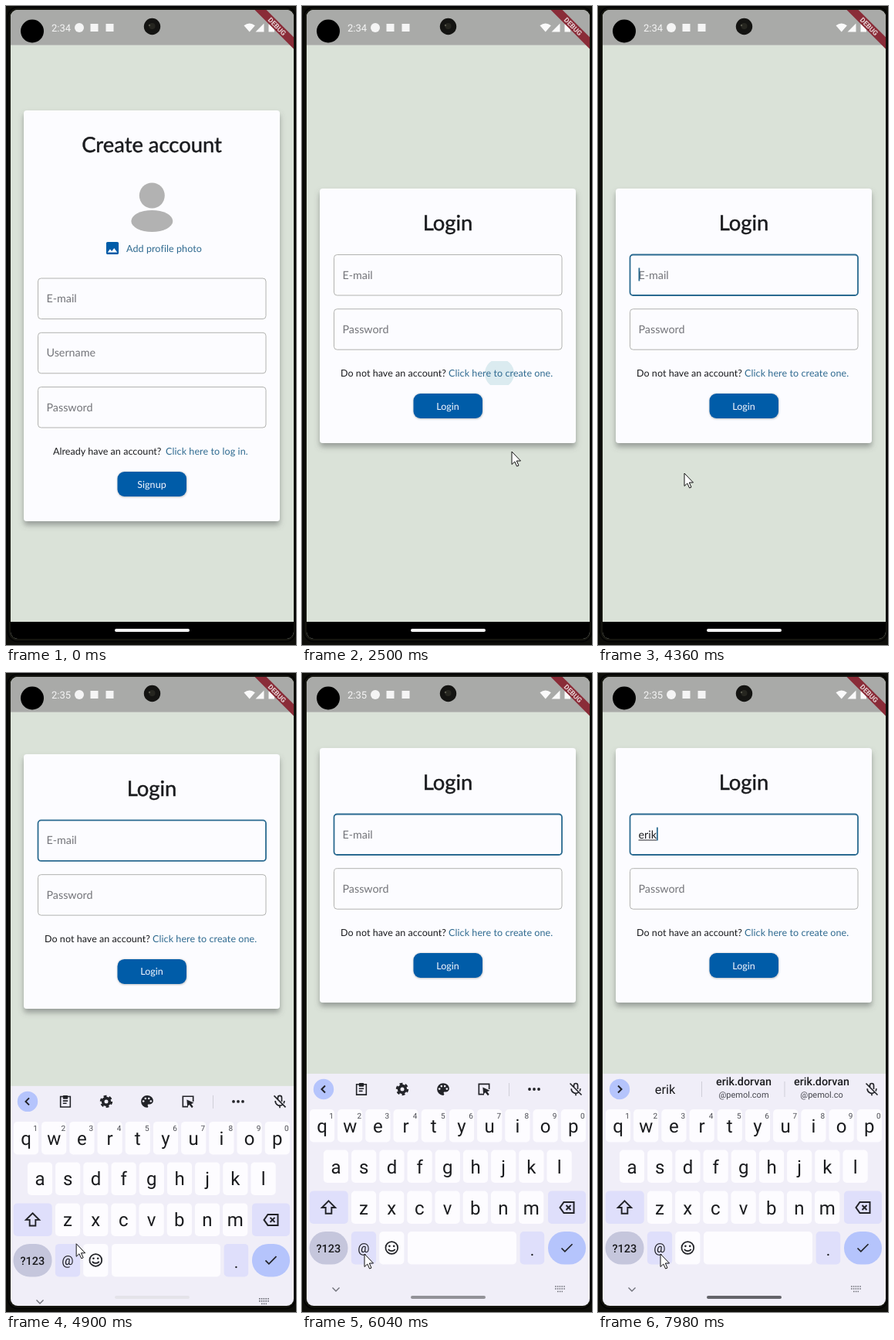
An HTML page that plays this animation: 376x826 px, repeating every 8000 ms.

```html
<!DOCTYPE html>
<html lang="en">
<head>
<meta charset="utf-8">
<title>Login form</title>
<style>
html, body { margin: 0; width: 100%; height: 100%; overflow: hidden; background: #0e0e0a; }
svg { display: block; width: 376px; height: 826px; }
text { font-family: Lato, sans-serif; fill: #1a1b1e; text-rendering: geometricPrecision; }
.title { font-size: 27.4px; text-anchor: middle; stroke: #1a1b1e; stroke-width: .45px; }
.hint { font-size: 14.3px; fill: #74757a; }
.small { font-size: 12.5px; letter-spacing: .05px; }
.link { fill: #2f6a90; letter-spacing: .09px; }
.btn { fill: #f6f8ff; text-anchor: middle; }
.kb text { font-family: Roboto, sans-serif; text-anchor: middle; }
.line { fill: none; stroke: #222328; stroke-width: 2; }
.rule { fill: none; stroke: #cfcfd8; stroke-width: 1; }
.field { fill: none; stroke: #b2b3b0; stroke-width: 1; }
</style>
</head>
<body>
<svg id="stage" viewBox="0 0 376 826" xmlns="http://www.w3.org/2000/svg"></svg>
<script>
const LOOP = 8000, NAME = 'erik', FULL = 'erik.dorvan';
const INK = '#222328', BLUE = '#005ca8', FOCUS_BLUE = '#2a6a90';
const PALE = '#b5c4fc', LILAC = '#dfdffb', KEYS = '#f0eef8';

const rect = (x, y, w, h, r, fill, more = '') =>
  `<rect x="${x}" y="${y}" width="${w}" height="${h}" rx="${r}" fill="${fill}" ${more}/>`;
const disc = (x, y, r, fill, more = '') => `<circle cx="${x}" cy="${y}" r="${r}" fill="${fill}" ${more}/>`;
const text = (x, y, s, cls = '', more = '') => `<text x="${x}" y="${y}" class="${cls}" ${more}>${s}</text>`;
const line = (d, more = '') => `<path class="line" d="${d}" ${more}/>`;
const rule = d => `<path class="rule" d="${d}"/>`;
const icon = (x, y, size, body) =>
  `<g transform="translate(${x - size / 2} ${y - size / 2}) scale(${size / 24})">${body}</g>`;

// ---- forms (y is measured from the card's top) ----
const card = h => rect(23, 0, 332, h, 4, '#fcfcff', 'filter="url(#shadow)"');
const field = (y, hint, id = '') =>
  `<rect class="field" x="41.5" y="${y}" width="295.5" height="52.5" rx="4" ${id && `id="${id}Box"`}/>` +
  text(52.5, y + 31, hint, 'hint', id && `id="${id}Hint"`);
const button = (y, label) =>
  rect(144.5, y, 90, 33, 9, '#6f7276', 'opacity=".45" filter="url(#soft)"') +
  rect(144.5, y, 89.5, 32, 9, BLUE) + text(189, y + 20.5, label, 'small btn');
const ripple = (id, x, y, w) =>
  `<clipPath id="${id}Clip">${rect(x - 8, y - 20, w, 31, 15, '#000')}</clipPath>` +
  `<g clip-path="url(#${id}Clip)">${disc(x + 66, y - 4, 0, '#dbebf0', `id="${id}"`)}</g>`;

const signup = card(531) + text(189, 54, 'Create account', 'title') +
  disc(189.3, 110, 16.5, '#b2b2b2') +
  '<ellipse cx="189.3" cy="143" rx="27" ry="14" fill="#b2b2b2"/>' +
  icon(138, 178, 21.5, `<path fill="${BLUE}" d="M21 19V5c0-1.1-.9-2-2-2H5c-1.1 0-2 .9-2 2v14c0 1.1.9 2 2 2h14c1.1 0 2-.9 2-2z"/>
    <path fill="#fcfcff" d="M8.5 13.5l2.5 3L14.5 12l4.5 6H5z"/>`) +
  text(156, 182.5, 'Add profile photo', 'small link') +
  field(217, 'E-mail') + field(287.3, 'Username') + field(357.5, 'Password') +
  ripple('wave1', 207, 445, 119) +
  text(61, 445, 'Already have an account?', 'small') +
  text(207, 445, 'Click here to log in.', 'small link') + button(467, 'Signup');

const login = card(329) + text(189, 54, 'Login', 'title') +
  field(85.5, 'E-mail', 'mail') +
  text(52.5, 116.5, '', '', 'id="typed" font-size="14.3"') +
  `<path id="under" stroke="${INK}" stroke-width="1"/>` +
  rect(52.5, 102.5, 1.8, 17, 0, FOCUS_BLUE, 'id="caret"') +
  field(155.7, 'Password') +
  ripple('wave2', 190, 243, 148) +
  text(50, 243, 'Do not have an account?', 'small') +
  text(190, 243, 'Click here to create one.', 'small link') + button(265, 'Login');

// ---- keyboard ----
const PITCH = 36.2;
const key = (x, y, w, fill = '#fdfcff', r = 5) => rect(x - w / 2, y, w, 42.5, r, fill);
const keyRow = (letters, x0, y) => [...letters].map((c, i) =>
  key(x0 + i * PITCH, y, 32.2) + text(x0 + i * PITCH, y + 30, c, '', 'font-size="24"')).join('');
const digits = [...'1234567890'].map((c, i) =>
  text(38 + i * PITCH, 576, c, '', 'font-size="10" style="fill:#4a4b52"')).join('');

const tools =
  icon(77, 538, 19, line('M9 4H4v17h16V4h-5M8 11h8M8 15h6') + rect(8, 2, 8, 6, 1, INK)) +
  icon(130, 538, 20, disc(12, 12, 5.2, 'none', `stroke="${INK}" stroke-width="4.4"`) +
    disc(12, 12, 8.3, 'none', `stroke="${INK}" stroke-width="3" stroke-dasharray="4.7 3.99"`)) +
  icon(183, 538, 21, `<path fill="${INK}" d="M12 3a9 9 0 0 0 0 18c1 0 1.6-.9 1.5-1.8-.1-.7-.8-1.1-.8-1.8 0-.8.7-1.4 1.5-1.4H16c2.8 0 5-2.2 5-5 0-4.4-4-8-9-8z"/>` +
    [[6.5, 11.5], [9.5, 7.5], [14.5, 7.5], [17.5, 11.5]].map(p => disc(...p, 1.5, KEYS)).join('')) +
  icon(236, 538, 20, line('M12 20H4V4h16v8') + `<path fill="${INK}" d="M10 9l11 5-4 2 3 4-2 2-4-5-3 3z"/>`) +
  rule('M268.5 530V547') +
  [295, 301, 307].map(x => disc(x, 538, 1.9, INK)).join('');

const suggestion = (x, mail) =>
  text(x, 533, FULL, '', 'font-size="14.3" font-weight="500"') +
  text(x, 549, mail, '', 'font-size="11" style="fill:#46474e"');
const hints = text(87, 544, '', '', 'id="word" font-size="16.3"') +
  rule('M134.5 528V548M242 528V548') +
  suggestion(189, '@pemol.com') + suggestion(290, '@pemol.co');

const keyboard = rect(0, 518, 376, 310, 0, KEYS) +
  disc(28, 538, 13.2, PALE) +
  line('', 'id="chev"') + `<g id="tools">${tools}</g><g id="hints">${hints}</g>` +
  icon(355, 538, 20, line('M9 9V6a3 3 0 0 1 6 0v6M5 11a7 7 0 0 0 11 6M12 18v4M19 11a7 7 0 0 1-1 4M3 3l18 18')) +
  keyRow('qwertyuiop', 26, 564) + digits + keyRow('asdfghjkl', 44, 616.5) + keyRow('zxcvbnm', 80, 669.5) +
  key(34.7, 669.5, 50, LILAC) + icon(34.5, 691, 23, line('M12 3l9 9h-5v8H8v-8H3z')) +
  key(343.5, 669.5, 49, LILAC) + icon(343.5, 691, 24, line('M8 5h13v14H8L3 12zM11 9l6 6M17 9l-6 6')) +
  key(34.5, 722, 50, '#c5c6dc', 21) + text(34.3, 749, '?123', '', 'font-size="14.5" font-weight="500"') +
  key(80, 722, 32.2, LILAC) + text(80, 749, '@', '', 'font-size="17"') +
  key(116.3, 722, 32.2) +
  icon(116.3, 743, 21, line('M7 14a5.3 4 0 0 0 10 0') + disc(12, 12, 9, 'none', `stroke="${INK}" stroke-width="2"`) +
    disc(8.7, 9.5, 1.5, INK) + disc(15.3, 9.5, 1.5, INK)) +
  key(207.5, 722, 141) + key(298.4, 722, 31.5, LILAC) + text(298.4, 753, '.', '', 'font-size="21"') +
  key(343.5, 722, 49, PALE, 21) + icon(343.5, 743.5, 21, line('M4 12l5 5L20 6')) +
  line('M39.5 794.5l4.5 4.5l4.5-4.5', 'style="stroke:#70717a;stroke-width:1.4"') +
  line('M328 793h13M328 796h13M331 799.5h7', 'style="stroke:#70717a;stroke-width:1.6;stroke-dasharray:1.6 1.2"');

// ---- whole stage ----
const stage = document.getElementById('stage');
stage.innerHTML = `<defs>
  <filter id="shadow" x="-10%" y="-10%" width="120%" height="125%">
    <feDropShadow dx="0" dy="5" stdDeviation="3.6" flood-color="#55585a" flood-opacity=".5"/></filter>
  <filter id="soft" x="-10%" y="-30%" width="120%" height="170%"><feGaussianBlur stdDeviation="1.2"/></filter>
  <clipPath id="screen">${rect(6, 5, 367, 813, 9, '#000')}</clipPath></defs>` +
  rect(0, 0, 376, 826, 0, '#0e0e0a') +
  rect(2.5, 1.5, 373, 820, 13, '#15150f', 'stroke="#040404" stroke-width="2"') +
  `<g clip-path="url(#screen)">` +
  rect(0, 0, 376, 826, 0, '#dae2d8') +
  rect(0, 796, 376, 30, 0, '#000') +
  `<g id="signup" transform="translate(0 135)">${signup}</g><g id="login">${login}</g>` +
  `<g id="kb" class="kb">${keyboard}</g>` +
  rect(141, 805, 97, 4, 2, '#f6f6f6', 'id="handle"') +
  rect(0, 0, 376, 50.5, 0, '#a9aaa8') +
  text(59, 32.5, '', '', 'id="clock" style="font:13px Roboto,sans-serif;fill:#f5f5f5"') +
  disc(95, 28, 6, '#f5f5f5') + rect(109.5, 23, 10, 10, 0, '#f5f5f5') + rect(129.5, 23, 10, 10, 0, '#f5f5f5') +
  `<path fill="#fafafa" d="M308.5 25.2q7.2-5.6 14.4 0l-7.2 8.2zM323.5 33.5h11v-11zM340.5 23.5h2v-1.6h3.5v1.6h2v10h-7.5z"/>` +
  disc(34, 32.5, 15, '#000') + disc(189.5, 26.5, 10.7, '#141412') + disc(189.5, 26, 4, '#262620') + disc(186, 25, 1.2, '#56564a') +
  `<g transform="translate(373 5) rotate(45)">${rect(-50, 25, 100, 10.7, 0, '#8a2c38')}` +
  text(0, 33.6, 'DEBUG', '', 'text-anchor="middle" style="font:bold 9px Roboto,sans-serif;fill:#e6d3d5"') + '</g></g>' +
  `<path id="mouse" d="M0 0V16.5L3.8 13L6.6 19L9 18L6.3 12H11.5Z" fill="#fff" stroke="#111" stroke-width="1"/>`;

const $ = id => document.getElementById(id);
const set = (id, attrs) => { for (const k in attrs) $(id).setAttribute(k, attrs[k]); };
const show = (id, on) => set(id, { visibility: on ? 'visible' : 'hidden' });
const clamp = v => Math.max(0, Math.min(1, v));
const span = (t, a, b) => clamp((t - a) / (b - a));
const smooth = p => p * p * (3 - 2 * p);

// value at t along [time, ...numbers] stops
function along(stops, t, ease) {
  let i = 0;
  while (i < stops.length - 2 && t >= stops[i + 1][0]) i++;
  const [a, b] = [stops[i], stops[i + 1]], p = ease(span(t, a[0], b[0]));
  return a.slice(1).map((v, j) => v + (b[j + 1] - v) * p);
}

const PATH = [[1260, 363, 679], [1950, 272, 576], [2700, 272, 576], [3500, 150, 362], [4080, 140, 350],
  [4360, 112, 604], [5060, 88, 758], [5440, 81, 751], [8000, 81, 751]];
const TINT = [[4440, 246, 246, 246], [5060, 222, 221, 228], [6040, 146, 146, 152], [7980, 100, 100, 106]];
const TYPED_AT = [6700, 6960, 7250, 7520];
const SWAP = 2340, FOCUS = 4080, SLIDE = 4440;

function draw(t) {
  const left = 278 * (1 - span(t, SLIDE, 5190)) ** 3;
  show('signup', t < SWAP);
  show('login', t >= SWAP);
  set('login', { transform: `translate(0 ${236 - (278 - left) / 2})` });

  const wave = { r: t < 2260 ? 0 : 3 + (t - 2260) / 15, opacity: 1 - span(t, 2560, 2800) };
  set('wave1', t < SWAP ? wave : { r: 0 });
  set('wave2', t < SWAP ? { r: 0 } : wave);

  const focused = t >= FOCUS;
  set('mailBox', { style: focused ? `stroke:${FOCUS_BLUE};stroke-width:1.8` : '' });
  const count = TYPED_AT.filter(at => t >= at).length, word = NAME.slice(0, count);
  $('typed').textContent = $('word').textContent = word;
  const w = count ? $('typed').getComputedTextLength() : 0;
  show('mailHint', t >= SWAP && !count);
  set('under', { d: count ? `M52.5 119h${w}` : '' });
  set('caret', { x: 52.5 + w });
  show('caret', focused && (count > 0 || (t - FOCUS) % 1000 < 500));

  show('kb', t >= SLIDE);
  set('kb', { transform: `translate(0 ${left})`, opacity: span(t, SLIDE - 20, SLIDE + 90) });
  show('tools', t >= SLIDE && !count);
  show('hints', count > 0);
  set('chev', { d: count ? 'M26 533.5l4.5 4.5l-4.5 4.5' : 'M30 533.5l-4.5 4.5l4.5 4.5' });
  set('handle', { fill: `rgb(${along(TINT, t, p => p).map(Math.round)})` });
  $('clock').textContent = t < 4700 ? '2:34' : '2:35';

  show('mouse', t >= 1260);
  set('mouse', { transform: `translate(${along(PATH, t, smooth)})` });
}

const start = performance.now();
function tick() {
  draw((performance.now() - start) % LOOP);
  requestAnimationFrame(tick);
}
tick();
</script>
</body>
</html>
```
